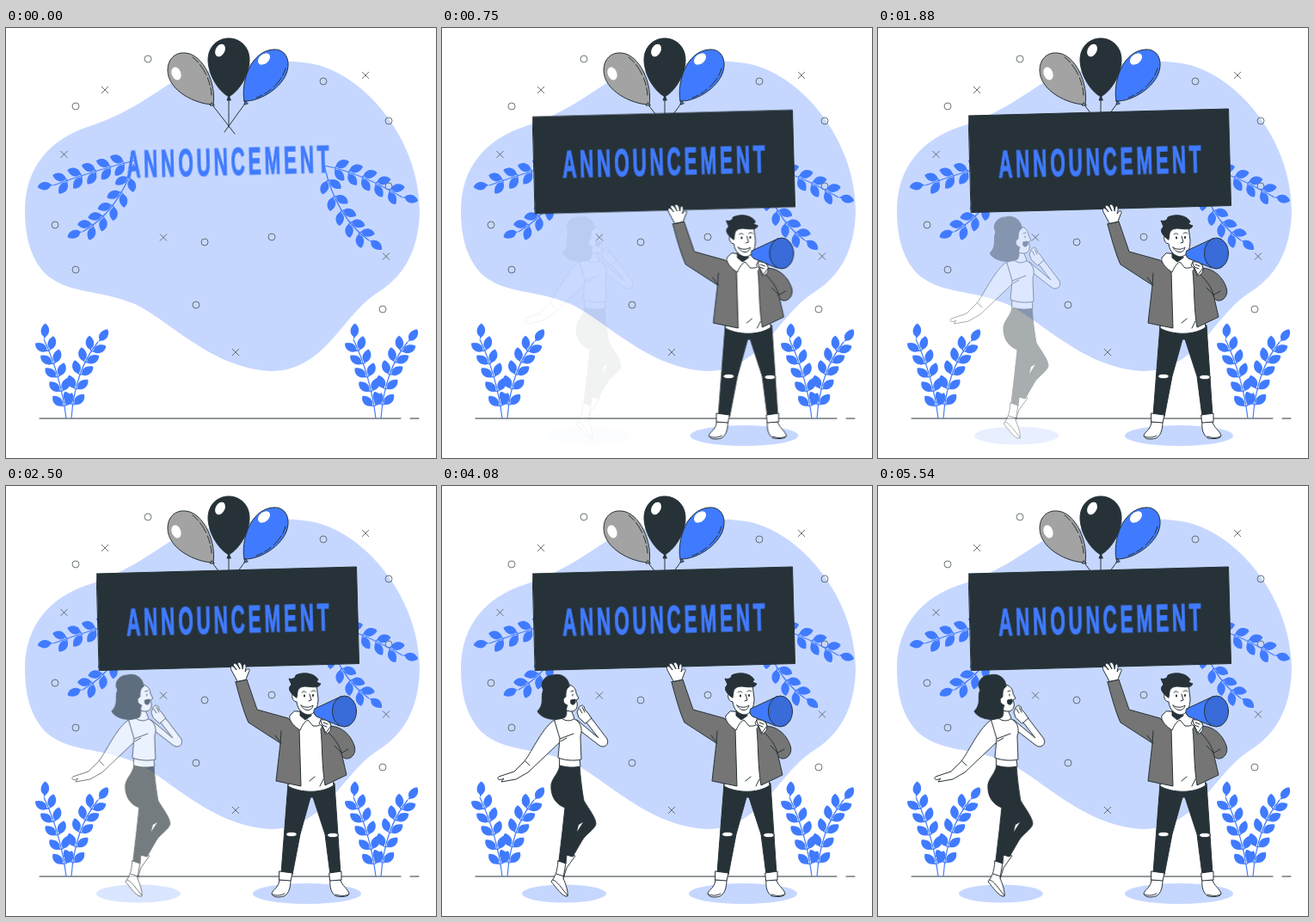
Recreate the animation shown at these times as an HTML page. Size 500x500 px, loop 5.58 s.

```html
<!DOCTYPE html>
<html lang="en">
<head>
<meta charset="utf-8">
<title>Announcement</title>
<style>
html, body { margin: 0; width: 100%; height: 100%; overflow: hidden; background: #fff; }
svg { display: block; width: 100%; height: 100%; }

.ink { stroke: #263238; stroke-width: 1; stroke-linejoin: round; stroke-linecap: round; }
.line { fill: none; }
.white { fill: #fff; }
.dark { fill: #263238; }
.blue { fill: #407bff; }
.grey { fill: #757575; }
.pale { fill: #c6d7ff; }
.stem { fill: none; stroke: #407bff; stroke-width: 1.2; }
.confetti { fill: none; stroke: #4b555a; stroke-width: .8; }
.sign {
  font: bold 45px "Liberation Sans", Arial, sans-serif;
  font-kerning: none;
  letter-spacing: 7.6px;
  text-rendering: geometricPrecision;
  fill: #407bff;
  stroke: #407bff;
  stroke-width: 1.2px;
  vector-effect: non-scaling-stroke;
}

/* each entrance overshoots a little, then settles */
#board, #man, #woman {
  animation: 5.58s infinite cubic-bezier(.36, -.01, .5, 1.38);
}
#board { animation-name: drop; }
#man { animation-name: fromLeft; }
#woman { animation-name: fromRight; }
@keyframes drop {
  0% { opacity: 0; transform: translateY(-30px); }
  17.92%, 100% { opacity: 1; transform: none; }
}
@keyframes fromLeft {
  0% { opacity: 0; transform: translateX(-30px); }
  17.92%, 100% { opacity: 1; transform: none; }
}
@keyframes fromRight {
  0% { opacity: 0; transform: translateX(30px); }
  100% { opacity: 1; transform: none; }
}
</style>
</head>
<body>
<svg viewBox="0 0 500 500">
  <defs>
    <path id="leaf" class="blue" d="M0 0L3 -1C5 -7 12 -8 18 -4C17 2 9 6 3 1Z"/>
  </defs>

  <path class="pale" d="M22 213C22 160 53 129 95 115C140 100 160 84 190 65C240 42 310 36 345 40C410 45 481 125 481 213C480 262 460 291 430 309C390 336 370 399 308 399C240 396 190 340 150 321C105 303 75 310 47 287C30 270 22 245 22 213Z"/>
  <path id="confetti" class="confetti"/>
  <path class="ink line" d="M39 454H459M470 454H480"/>

  <g id="plant"></g>
  <use href="#plant" x="360"/>
  <g id="sprigs"></g>

  <g class="ink">
    <path class="line" d="M238 87L266 123M259 80V115M280 85L254 121"/>
    <path fill="#a3a3a3" d="M241 89C221 89 188 73 188 49C188 36 197 28 208 29C230 30 245 66 241 89Z"/>
    <path class="line" stroke-dasharray="9 3 14 4" d="M217 34C229 43 238 61 239 78"/>
    <path class="dark" d="M259 80C245 72 235 52 235 37C235 22 246 12 259 12C272 12 283 22 283 37C283 52 273 72 259 80Z"/>
    <path class="blue" d="M277 85C273 65 283 27 311 25C322 24 329 33 328 44C327 66 297 86 277 85Z"/>
    <path class="line" stroke-dasharray="9 3 14 4" d="M325 47C321 62 306 76 291 81"/>
    <path class="dark" d="M259 79L257 84H261Z"/>
    <path class="blue" d="M278 85L277 89L281 88Z"/>
    <path fill="#a3a3a3" d="M239 87L237 90L242 90Z"/>
  </g>
  <g class="white">
    <ellipse rx="5.3" ry="7.8" transform="translate(198 53) rotate(-20)"/>
    <ellipse rx="5.3" ry="7.8" transform="translate(249 26) rotate(28)"/>
    <ellipse rx="5.5" ry="8" transform="translate(300 36) rotate(50)"/>
  </g>

  <path id="board" class="ink dark" d="M105.500 102L407.500 94L410.500 206.500L108.500 214.500Z"/>
  <text class="sign" transform="translate(140.500 174) rotate(-1.500) scale(.5 1)">ANNOUNCEMENT</text>

  <g id="man">
    <ellipse class="pale" cx="350" cy="474" rx="63" ry="12"/>
    <g class="ink">
      <path class="white" d="M318 458L331 458C331 468 328 475 323 477C316 479 310 478 309 474C310 469 317 468 318 458Z"/>
      <path class="white" d="M377 458H389C390 464 398 469 399 474C398 478 390 478 384 477C378 474 376 466 377 458Z"/>
      <path class="line" d="M310 475C315 477 320 476 324 474M383 475C389 477 394 477 398 475"/>
      <path class="dark" d="M328 346L320 450L333 452L342 405L354 362L357 362L371 405L377 452L389 451L382 346Z"/>
      <path class="white" d="M318 448L333 450L331 459L318 458ZM376 450L390 448L390 458L377 459Z"/>
      <ellipse class="white" cx="332" cy="405" rx="6.500" ry="2.800"/>
      <ellipse class="white" cx="380" cy="406" rx="6.500" ry="2.800"/>

      <path class="white" d="M334 268L328 349C342 357 367 358 381 348L369 275Z"/>
      <path class="line" d="M353 343L359 338M365 349L369 341"/>

      <path class="grey" d="M373 280C383 277 399 284 405 302C408 310 402 318 395 317L376 307Z"/>
      <path class="grey" d="M368 280C374 286 387 297 390 310L396 336L371 348C367 325 368 300 366 283Z"/>
      <path class="grey" d="M267 228L280 225L292 260L328 270L341 283L343 349L314 343L319 299L282 275C277 265 270 240 267 228Z"/>
      <path class="line" d="M319 299L320 285M313 290L320 299M390 310L382 302M398 306L389 311"/>

      <path class="white" d="M269 227L262 214C260 208 264 208 268 214L264 208C265 204 269 207 272 213L269 206C272 203 275 208 275 213L276 208C279 205 280 210 278 216C281 211 285 212 282 217L279 225Z"/>

      <path class="white" d="M335 262L330 267C328 273 337 281 342 284C344 279 347 274 351 272L357 279C365 280 369 276 369 271L358 264Z"/>
      <path class="dark" d="M342 260V267L348 272L355 267Z"/>
      <path class="white" d="M337 236C331 240 331 250 338 251C339 260 345 265 351 266C359 266 363 258 363 247L361 231L341 231Z"/>
      <path class="dark" d="M336 245C330 240 327 235 332 231L329 224C333 225 336 224 337 220C345 216 358 217 363 225L361 228L366 230C364 235 357 234 349 233C343 233 340 235 339 239L338 246Z"/>
      <path class="line" d="M344 240C346 238 348 239 349 240M355 239C357 237 359 238 360 239M353 242L355 249L352 250"/>
      <path class="white" d="M343 255C347 258 353 258 357 255C356 262 347 263 343 255Z"/>
      <path class="line" stroke-width="2" d="M347 243.500V244.500M357 243V244"/>

      <path class="white" d="M367 270L364 276L368 280L371 288C375 288 378 285 378 279L376 273Z"/>
      <path class="blue" d="M359 259L390 244.500L388 279L361 268C358 266 357 261 359 259Z"/>
      <ellipse cx="393.500" cy="262" rx="14" ry="18" fill="#396bd9"/>
      <path class="white" d="M366 272C370 271 377 273 378 279L372 287L368 279Z"/>
      <path class="line" d="M369 275L374 277M368 278L373 280"/>
    </g>
  </g>

  <g id="woman">
    <ellipse class="pale" cx="143" cy="474" rx="49" ry="10.500"/>
    <g class="ink">
      <path class="white" d="M145 428L156 430L146 444L141 460L134 459L137 440Z"/>
      <path class="white" d="M136 436L145 438L142 456C145 463 148 472 147 477C142 479 133 466 128 460C132 455 135 450 136 436Z"/>
      <path class="line" d="M130 458C135 459 140 468 147 476M134 451L143 454"/>
      <path class="dark" d="M138 323L161 324C162 340 164 355 166 366C172 376 180 386 180 393C178 400 169 404 164 412L153 431L146 429L145 439L137 436L141 402L144 374C133 370 127 360 128 347C130 338 138 333 138 323Z"/>
      <path class="white" stroke="none" d="M160 394L165 391L158 402Z"/>
      <path class="white" d="M138 315L161 317L162 326C154 328 145 327 138 325Z"/>

      <path class="white" d="M158 272L183 293L169 275L174 269L193 294C196 301 189 306 183 301L161 284Z"/>
      <path class="white" d="M132 272C119 279 106 308 97 320L85 332L67 338C64 341 68 343 73 340L70 344L87 341L101 333L140 296Z"/>
      <path class="line" d="M97 319L103 325"/>
      <path class="white" d="M132 272L143 267L155 271C162 274 165 282 162 291L163 318C154 320 144 319 136 316L138 294Z"/>
      <path class="line" d="M138 294L154 288M139 297L146 293"/>
      <path class="white" d="M138 256L139 269C145 275 153 273 155 270L151 260Z"/>
      <path class="white" d="M143 230C152 230 157 235 157 241L160 247L157 249C160 255 158 263 150 262L139 260Z"/>
      <path class="dark" d="M149 233C149 223 139 217 130 220C120 220 114 230 119 237C115 246 121 253 112 262C117 271 133 274 144 269C148 264 144 260 147 255C141 253 141 247 145 245C145 240 145 236 149 233Z"/>
      <path class="dark" d="M151 249L156 248C157 253 154 256 151 253Z"/>
      <path class="line" d="M151 239L154 238M153 242V244"/>
      <path class="white" d="M160 269L158 263L160 258C163 253 167 255 167 260L170 263L175 270L168 276Z"/>
      <path class="line" d="M161 259L164 264M164 257L167 263"/>
    </g>
  </g>
</svg>
<script>
const $ = id => document.getElementById(id);

const rings = [[165, 36], [81, 91], [369, 62], [445, 108], [445, 184], [57, 229],
  [231, 249], [309, 243], [81, 281], [221, 322], [438, 327]];
const crosses = [[115, 72], [418, 55], [67.500, 147], [183, 243.500], [442, 265.500], [267, 377]];
$('confetti').setAttribute('d',
  rings.map(([x, y]) => `M${x - 4} ${y}a4 4 0 1 0 8 0a4 4 0 1 0 -8 0`).join('') +
  crosses.map(([x, y]) => `M${x - 4} ${y - 4}l8 8m0 -8l-8 8`).join(''));

// A curved stem with pairs of leaves and one leaf at the tip.
function branch(x0, y0, cx, cy, x1, y1, tipTurn) {
  const mix = (a, c, b, t) => (1 - t) ** 2 * a + 2 * t * (1 - t) * c + t * t * b;
  const slope = (a, c, b, t) => (1 - t) * (c - a) + t * (b - c);
  const leaf = (t, turn) => {
    const x = mix(x0, cx, x1, t), y = mix(y0, cy, y1, t);
    const angle = Math.atan2(slope(y0, cy, y1, t), slope(x0, cx, x1, t)) * 180 / Math.PI;
    const flip = turn < 0 ? -1 : 1;
    return `<use href="#leaf" transform="translate(${x} ${y}) rotate(${angle + turn}) scale(1 ${flip})"/>`;
  };
  let out = `<path class="stem" d="M${x0} ${y0}Q${cx} ${cy} ${x1} ${y1}"/>` + leaf(1, tipTurn);
  for (const t of [.14, .32, .5, .67, .84]) out += leaf(t, -50) + leaf(t, 50);
  return out;
}

$('plant').innerHTML =
  branch(70, 454, 64, 405, 44, 362, 42) +
  branch(76, 454, 80, 398, 107, 365, 10);
$('sprigs').innerHTML =
  branch(150, 154, 108, 164, 55, 183, 25) +
  branch(149, 158, 130, 214, 89, 237, 22) +
  branch(370, 160, 412, 168, 461, 197, -30) +
  branch(370, 160, 384, 220, 422, 247, -12);
</script>
</body>
</html>
```
